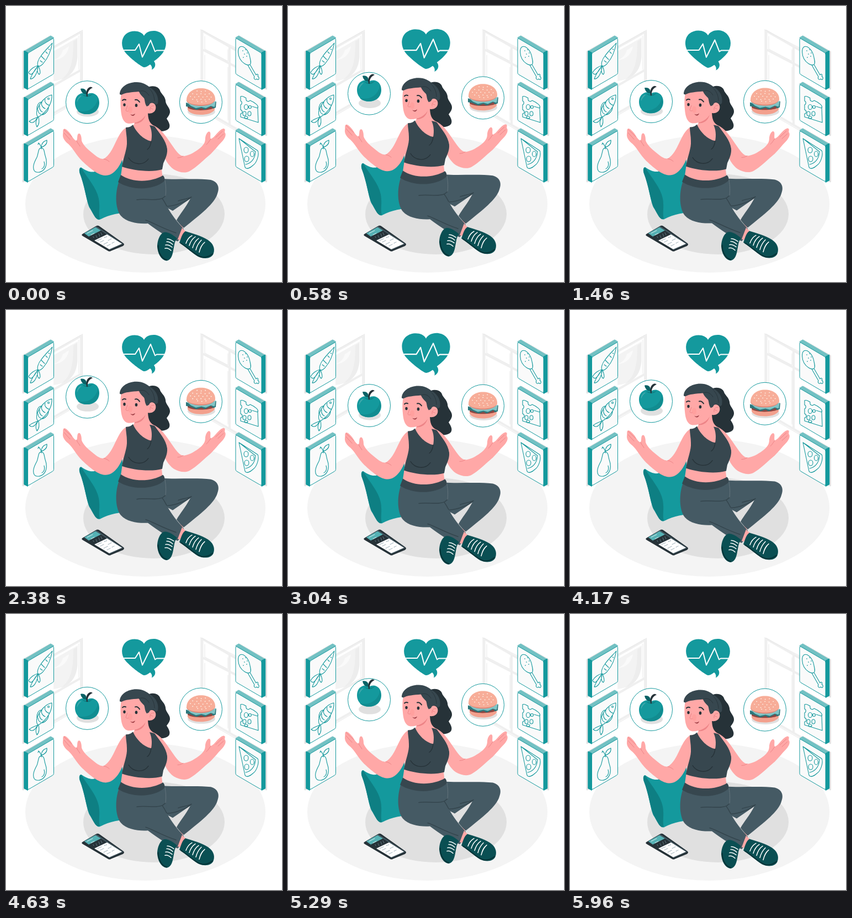
Recreate the animation shown at these times as an HTML page. Size 500x500 px, loop 6 s.

```html
<!DOCTYPE html>
<html lang="en">
<head>
<meta charset="utf-8">
<title>Healthy choices</title>
<style>
  html, body { margin: 0; width: 100%; height: 100%; overflow: hidden; background: #fff; }
  svg { display: block; width: 100vw; height: 100vh; }
  .teal { fill: #14999d; }
  .deep { fill: #0e7f83; }
  .skin { fill: #ffa8a7; }
  .top { fill: #37474f; }
  .dark { fill: #263238; }
  .legs { fill: #455a64; }
  .shoe { fill: #0a4f53; }
  .line { fill: none; stroke-linecap: round; stroke-linejoin: round; }
  .icon { stroke: #14999d; stroke-width: 1.1; }
  .crease { stroke: #ed8487; stroke-width: 1; }
  .fold { stroke: #34454d; stroke-width: 1.5; }
  .lace { stroke: #fff; stroke-width: 1.5; }
  .bar { stroke: #efefef; stroke-width: 4; }
  .thin { stroke: #e8e8e8; stroke-width: 1; }
  .ring { fill: #fff; stroke: #14999d; stroke-width: 1; }
</style>
</head>
<body>
<svg viewBox="0 0 500 500">
  <!-- windows -->
  <g>
    <path fill="#f3f3f3" d="M86 82L130 57V92C127 118 116 132 86 136Z"/>
    <path fill="#fafafa" d="M88 98C104 96 112 85 114 73L103 80C101 88 96 94 88 97Z"/>
    <path fill="#ededed" d="M122 64L129 60V92C128 113 118 128 100 133C116 122 122 104 122 64Z"/>
    <path class="line bar" d="M136 47V166L76 200M136 47L76 81M134 117L76 150"/>
    <path class="line thin" d="M138.500 44V168L76 204M138.500 44L76 79M132 54V115"/>
    <path class="line bar" d="M355.500 45V187L432 231M355.500 45L418 81M358 80L418 111M405 73V214"/>
    <path class="line thin" d="M353 43V189L432 235M353 43L418 77M360 55V78L402 100V79M360 89V183M402 111V207"/>
  </g>
  <ellipse cx="252.500" cy="358.500" rx="217.500" ry="124.500" fill="#f4f4f4"/>
  <ellipse cx="268" cy="377" rx="128" ry="73" fill="#e0e0e0"/>

  <g id="panels"></g>

  <!-- drawings on the panels -->
  <g class="line icon" transform="translate(0 1)">
    <path d="M84 66C82 76 77 92 69 101C66 106 60 110 58 107C56 104 58 96 63 90C69 81 78 73 84 66ZM58 107C52 108 45 113 42 118C39 120 44 124 47 122C51 119 54 113 58 107M58 107C52 115 47 122 44 131C47 132 52 128 54 123C57 117 58 112 58 107M58 108C56 115 56 120 60 123C64 121 61 113 59 108M64 90L68 94M62 98L66 101M72 82L75 85M70 96L67 93M77 77L79 78"/>
    <path d="M83 160C84 172 77 189 59 200C55 199 55 192 56 188C61 174 72 162 83 160ZM58 200C54 202 48 203 42 208C45 211 49 211 52 208M58 200C55 206 52 210 56 218C61 213 60 206 59 200M52 208L58 200M71 168C69 172 73 178 79 179M65 173C63 178 66 183 71 185M61 180C60 185 62 189 66 191M58 187C58 191 60 194 63 195M64 173C59 173 55 181 56 187M77 183C77 189 70 196 65 196"/>
    <circle cx="77" cy="167" r="1.500"/>
    <path d="M64 256C70 257 69 264 71 270C74 278 75 289 68 296C63 301 54 302 51 297C47 289 53 279 56 273C59 266 58 256 64 256ZM64 258C64 253 62 250 59 247M64 255C64 248 68 244 74 242C75 249 70 253 64 255M59 247L58 250M69 281C71 287 69 292 65 294"/>
    <path d="M424 73C430 70 438 78 441 88C443 97 445 103 442 105C437 108 428 102 424 95C420 88 419 76 424 73ZM438 106L450 127C448 131 452 134 454 131C458 135 460 129 456 126C458 123 455 121 453 124L442 105"/>
    <path d="M429 80v.3M434 78v.3M432 86v.3M436 90v.3M430 92v.3M437 84v.3" stroke-width="1.600"/>
    <path d="M425 163C428 161 432 164 435 166C434 171 439 174 442 170L448 173C454 177 458 180 456 184L457 210L425 200V194C429 194 429 188 425 187V178C428 177 428 172 425 171ZM456 184L446 181"/>
    <ellipse cx="435" cy="182" rx="3.500" ry="4.500"/><ellipse cx="441" cy="194" rx="3" ry="4"/>
    <ellipse cx="432" cy="194" rx="3" ry="4"/><circle cx="442" cy="182" r="2.500"/><ellipse cx="435" cy="201" rx="3" ry="2"/>
    <path d="M422 239L456 261C459 267 455 283 447 288C443 292 435 296 433 291ZM422 239L452 263C451 276 444 284 434 286"/>
    <ellipse cx="435" cy="260" rx="4" ry="5"/><ellipse cx="446" cy="267" rx="3.500" ry="5"/><ellipse cx="436" cy="276" rx="4" ry="5"/>
  </g>

  <!-- phone -->
  <g transform="translate(0 .7)">
    <path class="dark" d="M139 412L163 398Q166 396 169 398L212 428.500Q216 431 212 434L190 443Q187 445 184 442.500L139 416Q135.500 414 139 412Z"/>
    <path fill="#455a64" d="M141 411L164 398.500L212 430L188 441Z"/>
    <path fill="#55b1b4" d="M142 411L162 400L172 406L150 417Z"/>
    <path class="dark" d="M150 417L172 406L183 413L160 424Z"/>
    <path fill="#fff" d="M160 424L183 413L210 430L187 440Z"/>
    <path class="line" stroke="#78909c" stroke-width=".8" d="M158 417l1 2M163 415l2 4M168 412l2 5M172 410l2 4M166 424l7-3M171 427l6-3M177 431l8-4M183 434l6-3M178 419l5-2M185 424l6-3M192 429l4-2" stroke-dasharray="2 1"/>
    <path class="line" stroke="#fff" stroke-width=".8" d="M147 411l10-5M154 414l6-3"/>
  </g>

  <!-- heart -->
  <g id="heart">
    <path class="teal" d="M250 54C255 44 273 41.500 283 51C292 60 292 74 284 85C280 90 274 96 268 100C272 105 271 112 264 115.500C265 112 264 108 261 106C257 109 253 111 250 111C245 110 224 94 216 84C208 74 208 59 217 51C227 42.500 245 44 250 54Z"/>
    <path class="line" stroke="#fff" stroke-width="2" d="M214 80H234L241 69L247 92.500L262 62L270 82.500L273 80.500H290"/>
  </g>

  <!-- apple -->
  <g id="appleDisc">
    <circle class="ring" cx="147" cy="174.200" r="38.500"/>
    <ellipse cx="148" cy="191.500" rx="20" ry="9" fill="#e0e0e0"/>
    <g id="apple">
      <path class="teal" d="M147 160C157 154 169 161 169 175C169 188 160 196 147 196C134 196 125 188 125 175C125 161 138 154 147 160Z"/>
      <path fill="#118c90" d="M167 167C171 180 164 196 147 196C140 196 134 194 130 190C145 194 162 188 167 167Z"/>
      <path class="deep" d="M138 160C143 163 152 163 157 159C153 166 142 166 138 160Z"/>
      <path fill="#43a9ac" d="M130 168C132 164 135 162 137 163C133 166 130 170 129 174C128 172 129 170 130 168Z"/>
      <path fill="#0a6266" d="M146 160C139 160 136 155 135 150C142 148 147 153 146 160Z"/>
      <path class="dark" d="M146 164C144 155 147 147 154 146.500L157 148C150 151 147 157 148 164Z"/>
    </g>
  </g>

  <!-- burger -->
  <g id="burgerDisc">
    <circle class="ring" cx="353" cy="174.200" r="38.500"/>
    <ellipse cx="354" cy="191.500" rx="25" ry="9" fill="#e0e0e0"/>
    <path fill="#f3a08d" d="M329 180H378V188C373 195 362 197 353 197C341 197 332 194 329 188Z"/>
    <path fill="#8d4742" d="M329 178H378V184C371 190 336 191 329 184Z"/>
    <path fill="#2d777b" d="M326 175C340 181 366 181 381 173L380 184L375 186L372 182L360 188L354 185L345 188L333 183L326 182Z"/>
    <path fill="#82c4c5" d="M327 174C341 179 367 179 380 172L378 183L371 181L362 185L354 183L344 185L335 181Z"/>
    <path fill="#e28776" d="M327 170C326 176 339 181 353 181C368 181 380 175 379 168Z"/>
    <path fill="#f7ad98" d="M327 171C327 157 339 149 353 149C368 149 380 157 379 171C374 177 364 179 353 179C341 179 330 177 327 171Z"/>
    <path id="seeds" class="line" stroke="#fff3e9" stroke-width="1.600"/>
  </g>

  <!-- woman and pillow -->
  <g id="woman">
    <path class="teal" d="M137 293C146 299 153 302 161 300C180 293 198 281 210 275L226 374C207 374 187 378 172 386C164 391 160 379 151 365C145 351 143 325 134 304C131 296 134 291 137 293Z"/>
    <path class="deep" d="M137 294C147 311 164 329 168 349C171 365 167 377 170 386C162 389 159 377 151 364C145 349 142 325 134 304C132 297 134 291 137 294Z"/>
    <path class="line" stroke="#0e7f83" d="M161 300C175 303 186 299 199 292"/>

    <path class="dark" d="M253 150C263 142 276 145 279 153C280 158 288 163 289 171C289 180 298 184 297 193C296 198 293 201 291 204C294 209 299 216 295 222C289 228 276 229 264 223C254 218 253 206 256 194Z"/>

    <!-- far arm -->
    <path class="skin" d="M266 216C280 221 290 236 300 251C307 261 314 272 322 272C332 271 345 263 352 257C360 250 361 245 361 239C362 232 366 226 369 228C372 230 369 237 371 241C376 239 380 233 384 229C388 225 394 220 396 223C398 224 395 228 397 230C399 234 397 240 390 247C384 253 378 261 371 268C360 277 344 293 333 299C324 304 313 301 304 296C294 289 287 277 284 263Z"/>
    <path class="line crease" d="M371 241C368 244 367 248 363 251M321 272C317 274 315 275 311 275M384 241L394 232M380 238L392 227"/>

    <!-- near arm -->
    <path class="skin" d="M221 219C211 222 206 232 199 246C193 259 187 271 177 277C171 278 163 272 156 266C148 260 139 251 137 244C137 239 136 231 132 231C128 232 130 240 128 244C124 244 121 238 117 232C113 227 107 221 105 223C102 225 104 229 103 232C102 240 108 246 113 250C121 257 127 270 138 281C150 292 165 306 179 307C195 308 206 291 212 275L226 250Z"/>
    <path class="line crease" d="M128 244C129 248 132 250 134 254M177 277C182 278 185 280 187 282M105 230L116 242M105 224L119 237"/>

    <!-- torso -->
    <path class="skin" d="M233 196L257 190C257 204 259 213 270 218L281 252L282 296L285 322H206L211 287L216 225C227 222 233 217 233 209Z"/>
    <path fill="#ed8487" d="M233 207C242 206 249 202 253 197C250 209 242 213 233 213Z"/>
    <path class="top" d="M217 220C223 220 227 218 230 215C236 229 249 242 263 245C265 234 264 224 260 216C265 217 268 217 270 219C278 231 290 243 292 259C293 270 287 280 285 285L283 296C263 302 230 298 210 291C213 273 220 258 219 245C219 236 217 228 217 220Z"/>
    <path class="line" stroke="#263238" stroke-width="1.300" d="M222 275C230 288 249 290 258 277M263 245C262 253 259 258 256 260"/>

    <!-- far leg -->
    <path class="skin" d="M311 384L323 398C317 404 321 408 328 412L315 424L302 421L319 405Z"/>
    <path class="legs" d="M281 313C307 315 347 312 371 315C383 318 388 328 383 340C378 358 353 377 322 402C317 398 312 392 309 388C315 377 325 366 334 349L302 371L281 360Z"/>
    <path class="line fold" d="M291 363C309 362 327 354 336 346C329 350 319 350 312 353"/>

    <!-- near leg -->
    <path class="legs" d="M207 312C228 327 265 325 287 313C289 327 290 338 290 347L291 362C299 377 311 392 322 404C321 412 317 421 311 426.500C295 421 276 408 257 394C239 395 219 392 208 380C197 366 197 334 207 312Z"/>
    <path fill="#37474f" d="M208 306C229 321 265 319 284 307C287 309 288 313 287 317C267 335 226 334 203 319Z"/>
    <path class="line fold" d="M237 351C252 348 272 354 284 348L289 344M283 349C286 352 288 357 291 362M253 388C264 391 283 403 308 411"/>
    <path class="line" stroke="#718087" stroke-width=".7" d="M288 316C290 328 290 336 289 344"/>

    <!-- shoes -->
    <path class="shoe" d="M284 411C290 407 301 413 310 421C305 426 305 434 303 443C301 455 297 461.500 290 461.500C280 459 275 448 274 436C274 424 279 414 284 411Z"/>
    <path class="line" stroke="#043337" stroke-width="2" d="M275.500 434C276 447 282 458 291 460"/>
    <path class="line lace" d="M292 422C296 422 300 424 304 427M291 427C295 427 299 429 302 432M289 433C293 432 297 434 301 437M288 439C292 438 296 440 299 443"/>
    <path class="skin" d="M319 402L326 409L317 424L311 423Z"/>
    <path class="shoe" d="M325 408C337 412 354 416 366 424C375 430 379 439 376 448C373 458 359 459 348 454C337 447 324 435 314 429C317 421 319 412 325 408Z"/>
    <path class="line" stroke="#043337" stroke-width="2" d="M317 430C332 439 342 452 355 455C363 456 369 453 374 449"/>
    <path class="line lace" d="M337 416C331 419 328 424 326 430M343 418C337 422 334 427 332 434M349 421C343 425 340 431 338 438M354 424C349 429 346 434 344 442M360 428C354 433 352 438 350 446"/>

    <!-- head -->
    <path class="skin" d="M210 154C207 165 207 176 208 188C209 202 213 212 222 213C236 213 249 207 255 194C261 196 269 194 271 187C273 180 268 174 262 176L254 150Z"/>
    <path class="top" d="M206 160C206 147 221 137.500 237 138C247 138 256 143 260 147C270 152 278 164 275 177L271 179C268 173 261 174 259 180L255 182C251 177 252 171 250 167C246 163 242 159 241 155C229 156 215 157 209 161Z"/>
    <path class="line" stroke="#263238" stroke-width=".8" d="M241 155C248 152 254 154 259 162M258 148C266 155 269 164 269 172"/>
    <path class="line crease" d="M268 181C263 180 260 184 261 189M262 185L266 187M220 181L217 189C218 191 220 191 222 190"/>
    <ellipse cx="225" cy="188" rx="4" ry="6" fill="#ff9895" opacity=".5"/>
    <ellipse class="dark" cx="214.500" cy="179" rx="2.200" ry="2.800"/>
    <ellipse class="dark" cx="236" cy="180" rx="2.300" ry="3"/>
    <path class="line" stroke="#263238" stroke-width="2" d="M211 171C213 169 215 169 217 170M234 170C237 169 240 171 242 174"/>
    <path fill="#9e3f46" d="M225 196C228 198 231 197 234 195C233 199 229 201 225 196Z"/>
  </g>
</svg>
<script>
  const LOOP = 6000, FLOAT = 1500, STEP = 1000 / 24;
  const BEATS = [[0, 1], [600, 1.1], [1800, 1], [2400, 1], [3000, 1.1], [3600, 1], [6000, 1]];
  const $ = id => document.getElementById(id);

  // Isometric card with its outer side on the left; mirrored for the right column
  const card = y => `<g transform="translate(0 ${y})" stroke-linejoin="round">
    <path d="M31 82L80 54V120L31 149Z" fill="#e3e3e3" stroke="#e3e3e3" stroke-width="3"/>
    <path d="M34 81L81 53.500L86 56.500L39 84Z" fill="#72c1c3" stroke="#72c1c3" stroke-width="2"/>
    <path d="M33.500 81L39 84V149.500L33.500 146.500Z" fill="#14999d" stroke="#14999d" stroke-width="2.500"/>
    <path d="M39.500 87Q39.500 84.500 41.500 83.300L84 58.400Q86.500 57 86.500 59.500V119.500Q86.500 122 84.500 123.200L42 148Q39.500 149.500 39.500 147Z" fill="#fafafa" stroke="#14999d"/></g>`;
  const column = [1, 85, 169].map(card).join('');
  $('panels').innerHTML = `${column}<g transform="translate(502.500 0) scale(-1 1)">${column}</g>`;

  // Sesame seeds in staggered rows: y, first x, count
  $('seeds').setAttribute('d', [[154, 346, 3], [159, 338, 5], [164, 334, 6], [169, 338, 5], [173, 347, 3]]
    .map(([y, x, n]) => Array.from({ length: n }, (_, i) => `M${x + i * 7.5} ${y + i % 2}h.4`).join('')).join(''));

  function beatAt(t) {
    const i = BEATS.findIndex(b => b[0] > t);
    const [t0, a] = BEATS[i - 1], [t1, b] = BEATS[i];
    return a + (b - a) * (t - t0) / (t1 - t0);
  }

  const lift = (id, y) => $(id).setAttribute('transform', `translate(0 ${-y})`);

  function draw(ms) {
    const t = Math.floor(((ms + 5) % LOOP) / STEP) * STEP;
    const rise = 10 * (1 - Math.abs(2 * (t % FLOAT) / FLOAT - 1));
    lift('woman', rise);
    lift('burgerDisc', rise);
    lift('appleDisc', 2 * rise);
    lift('apple', rise);
    $('heart').setAttribute('transform', `translate(250 79.500) scale(${beatAt(t)}) translate(-250 -79.500)`);
  }

  const start = performance.now();
  (function tick() {
    draw(performance.now() - start);
    requestAnimationFrame(tick);
  })();
</script>
</body>
</html>
```
